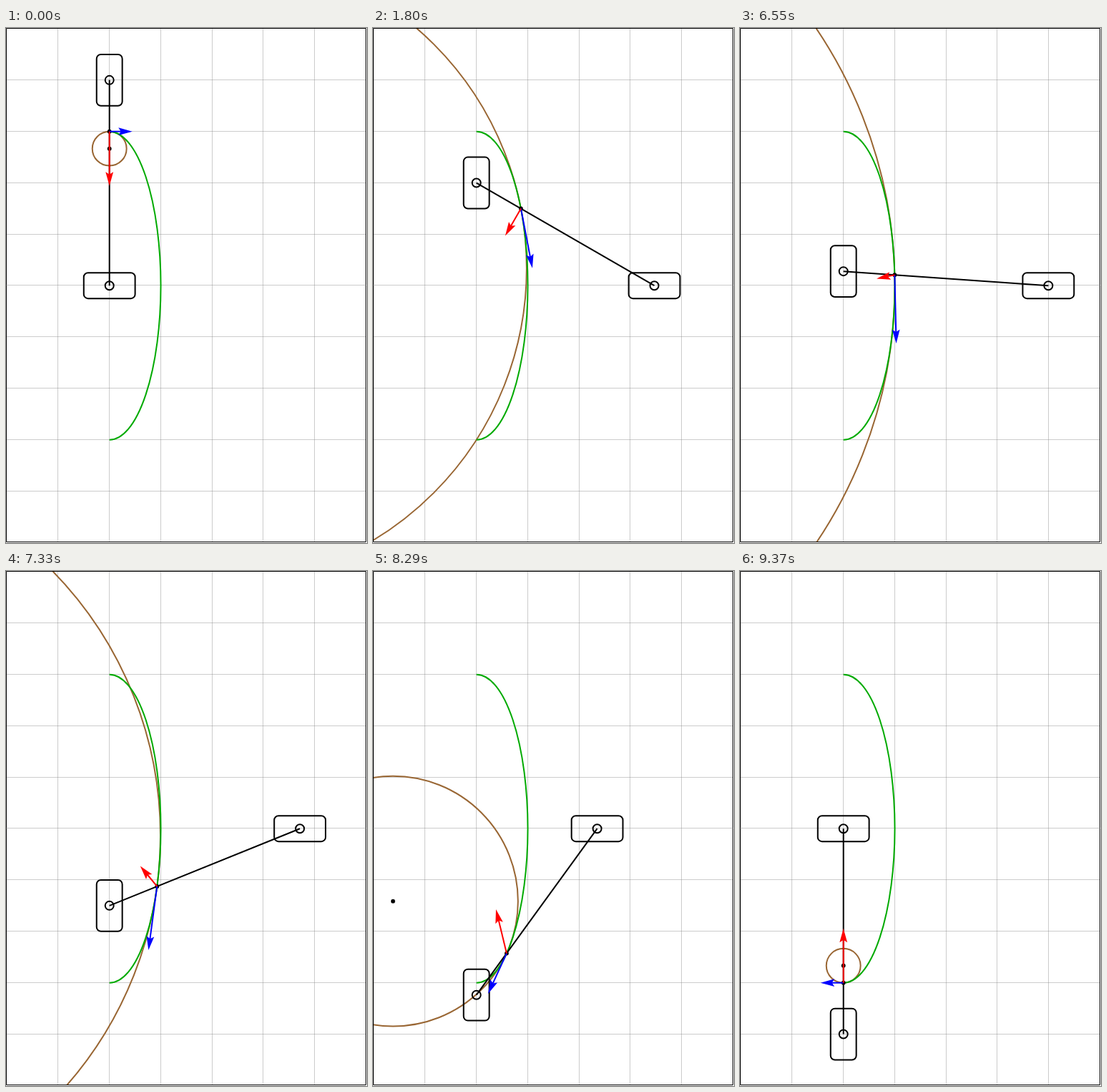
An HTML page with a canvas for the animation above (9400 ms loop, 505 by 720 pixels).

```html
<!DOCTYPE html>
<html lang="en">
<head>
<meta charset="utf-8">
<title>Elliptic trammel</title>
<style>
html, body { margin: 0; width: 100%; height: 100%; overflow: hidden; background: #fff; }
canvas { display: block; }
</style>
</head>
<body>
<canvas id="stage" width="505" height="720"></canvas>
<script>
const ctx = document.getElementById('stage').getContext('2d');
const UNIT = 71.84, ORIGIN_X = 144.7, ORIGIN_Y = 360.2;
const A = 1, B = 3, ROD = A + B;
const VELOCITY_SCALE = 0.446, ACCELERATION_SCALE = 0.353;
const STEP = 30, PAUSE_DEGREE = 60, RESUME = 5800, LOOP = 9400;

const toX = x => ORIGIN_X + x * UNIT;
const toY = y => ORIGIN_Y - y * UNIT;

function stroke(color, width, trace) {
  ctx.strokeStyle = color;
  ctx.lineWidth = width;
  ctx.beginPath();
  trace();
  ctx.stroke();
}

function line(color, width, x1, y1, x2, y2) {
  stroke(color, width, () => { ctx.moveTo(x1, y1); ctx.lineTo(x2, y2); });
}

function ring(color, x, y, radius) {
  stroke(color, 2, () => ctx.arc(x, y, radius, 0, 2 * Math.PI));
}

function dot(x, y) {
  ctx.fillStyle = '#000';
  ctx.beginPath();
  ctx.arc(x, y, 2.9, 0, 2 * Math.PI);
  ctx.fill();
}

function slider(x, y, width, height) {
  stroke('#000', 2, () => ctx.roundRect(x - width / 2, y - height / 2, width, height, 6));
  ring('#000', x, y, 6);
}

function arrow(color, x, y, dx, dy) {
  const length = Math.hypot(dx, dy) * UNIT;
  ctx.save();
  ctx.translate(x, y);
  ctx.rotate(Math.atan2(-dy, dx));
  line(color, 2, 0, 0, length - 15, 0);
  ctx.translate(length, 0);
  ctx.fillStyle = color;
  ctx.beginPath();
  ctx.moveTo(0, 0);
  ctx.lineTo(-19.5, 5.4);
  ctx.lineTo(-16, 0);
  ctx.lineTo(-19.5, -5.4);
  ctx.fill();
  ctx.restore();
}

function grid() {
  const color = 'rgba(128, 128, 128, 0.4)';
  const snap = n => Math.floor(n * 71.82 + 0.9) + 0.5;
  for (let i = 1; i < 7; i++) line(color, 1, snap(i), 0, snap(i), 719);
  for (let i = 1; i < 10; i++) line(color, 1, 0, snap(i), 504, snap(i));
}

function draw(degrees) {
  const angle = degrees * Math.PI / 180;
  const sin = Math.sin(angle), cos = Math.cos(angle);
  const px = toX(A * sin), py = toY(B * cos);
  const slideX = toX(ROD * sin), slideY = toY(ROD * cos);

  // Osculating circle: centre on the evolute, radius of curvature
  const centerX = toX((A * A - B * B) / A * sin ** 3);
  const centerY = toY((B * B - A * A) / B * cos ** 3);
  const radius = Math.hypot(A * cos, B * sin) ** 3 / (A * B) * UNIT;

  ctx.fillStyle = '#fff';
  ctx.fillRect(0, 0, 505, 720);
  grid();

  ctx.save();
  ctx.beginPath();
  ctx.rect(0, 0, 504, 719);
  ctx.clip();
  ring('#996633', centerX, centerY, radius);
  stroke('#00aa00', 2, () =>
    ctx.ellipse(ORIGIN_X, ORIGIN_Y, A * UNIT, B * UNIT, 0, -Math.PI / 2, Math.PI / 2));
  slider(ORIGIN_X, slideY, UNIT / 2, UNIT);
  slider(slideX, ORIGIN_Y, UNIT, UNIT / 2);
  line('#000', 2, ORIGIN_X, slideY, slideX, ORIGIN_Y);
  dot(px, py);
  dot(centerX, centerY);
  arrow('#00f', px, py, A * cos * VELOCITY_SCALE, -B * sin * VELOCITY_SCALE);
  arrow('#f00', px, py, -A * sin * ACCELERATION_SCALE, -B * cos * ACCELERATION_SCALE);
  ctx.restore();

  stroke('#000', 1, () => ctx.rect(0.5, 0.5, 503, 718));
}

// One degree per step, with a long rest at PAUSE_DEGREE
function degreesAt(time) {
  return time < RESUME
    ? Math.min(PAUSE_DEGREE, Math.floor(time / STEP))
    : PAUSE_DEGREE + 1 + Math.floor((time - RESUME) / STEP);
}

let start;
function tick(now) {
  start ??= now;
  draw(degreesAt(Math.max(0, now - start) % LOOP));
  requestAnimationFrame(tick);
}
draw(0);
requestAnimationFrame(tick);
</script>
</body>
</html>
```
